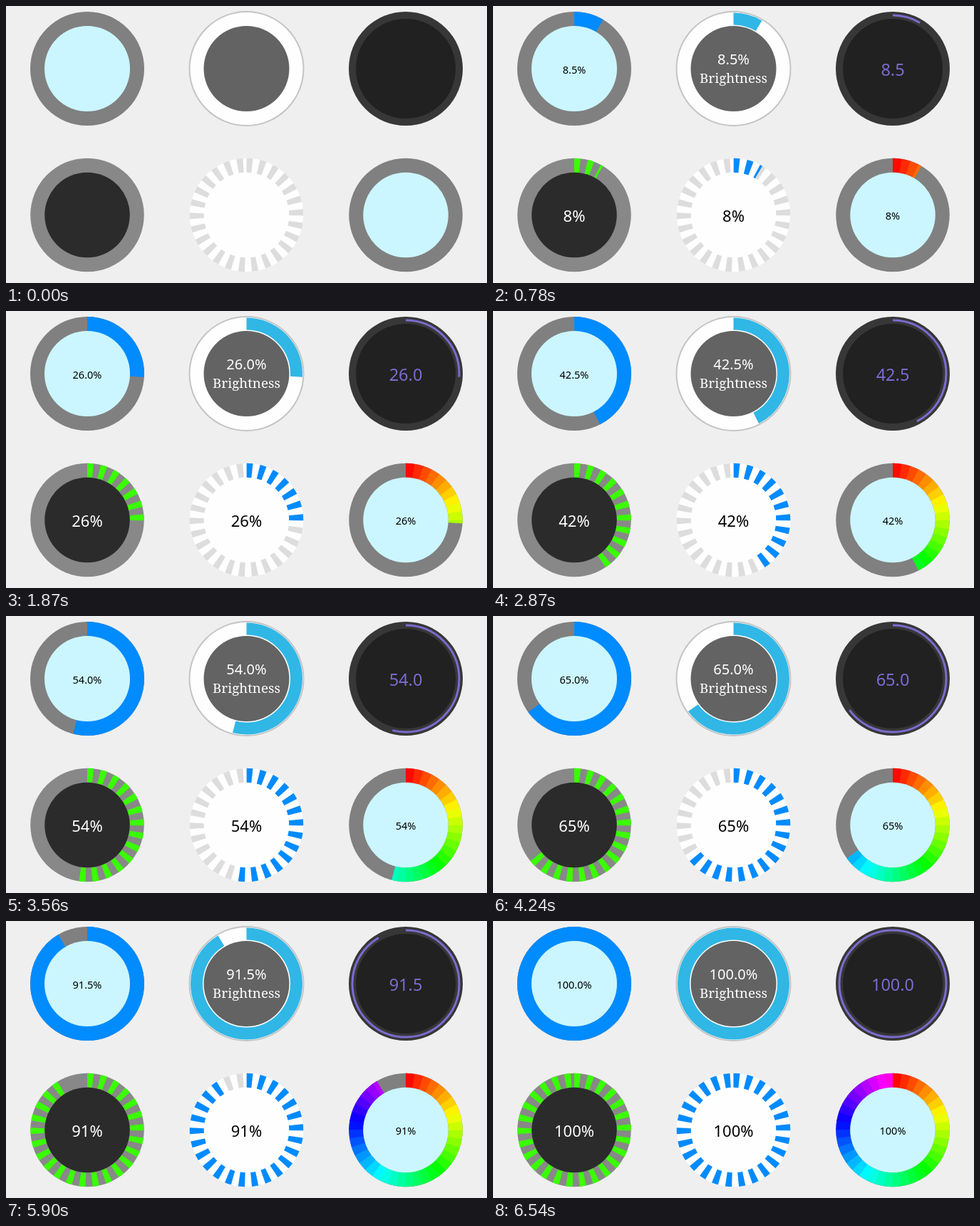
These frames come from a looping animation (675 px wide and 389 px high, 8000 ms). An HTML page without scripts:

```html
<!DOCTYPE html>
<html lang="en">
<head>
<meta charset="utf-8">
<title>Circular gauges</title>
<style>
/* --h: progress in half percents, --i: whole percents */
@property --h { syntax: "<integer>"; inherits: true; initial-value: 0; }
@property --i { syntax: "<integer>"; inherits: true; initial-value: 0; }

html, body { margin: 0; width: 100%; height: 100%; overflow: hidden; background: #efefef; }
body { position: relative; animation: fill 8s -1ms infinite steps(1); }
svg { position: absolute; left: 0; top: 0; width: 675px; height: 389px; }

@keyframes fill {
  0% { --h: 0; }
  2.875% { --h: 0; animation-timing-function: steps(4); }
  9.75% { --h: 17; }
  11.625% { --h: 22; animation-timing-function: steps(3); }
  15.625% { --h: 32; }
  17.5% { --h: 37; animation-timing-function: steps(4); }
  23.375% { --h: 52; }
  24.375% { --h: 55; animation-timing-function: steps(4); }
  30.375% { --h: 70; }
  31.875% { --h: 74; animation-timing-function: steps(3); }
  35.875% { --h: 85; }
  37.75% { --h: 90; animation-timing-function: steps(5); }
  44.5% { --h: 108; }
  46.375% { --h: 113; animation-timing-function: steps(5); }
  53% { --h: 130; }
  55.125% { --h: 135; animation-timing-function: steps(3); }
  58.875% { --h: 145; }
  61% { --h: 151; animation-timing-function: steps(3); }
  64.625% { --h: 160; }
  66.75% { --h: 165; animation-timing-function: steps(5); }
  73.75% { --h: 183; }
  75.875% { --h: 188; animation-timing-function: steps(3); }
  80.25% { --h: 199; }
  81.75%, 100% { --h: 200; }
}
@keyframes show {
  0% { visibility: hidden; }
  2.875%, 100% { visibility: visible; }
}

.arc, .dash, .hue circle { fill: none; }
.arc { stroke-dasharray: calc(var(--h) * .5px) 200px; }
.dash { r: 69.75px; stroke-width: 20px; stroke-dasharray: 8px 9px; }
.hue circle {
  r: 69.75px;
  stroke: hsl(calc(var(--k) * 7.8 + 2) 100% 50%);
  stroke-width: 20px;
  stroke-dasharray: 12px 999px;
  stroke-dashoffset: calc(var(--k) * -10.956px);
}

.label {
  --i: calc(var(--h) / 2 - .25);
  counter-reset: i var(--i) d calc(5 * (var(--h) - 2 * var(--i)));
  position: absolute;
  left: calc(var(--x) * 1px - 80px);
  top: calc(var(--y) * 1px);
  width: 160px;
  text-align: center;
  white-space: nowrap;
  font: 500 14.5px/0 "Noto Sans", "Open Sans", sans-serif;
  color: #000;
  animation: show 8s -1ms infinite steps(1);
}
.dec::before { content: counter(i) "." counter(d); }
.int::before { content: counter(i); }
.name { font: 400 18.8px/0 "Noto Serif", serif; }
</style>
</head>
<body>
<svg viewBox="0 0 675 389">
  <mask id="done" maskUnits="userSpaceOnUse" x="-90" y="-90" width="180" height="180">
    <circle class="arc" r="69.75" pathLength="100" stroke="#fff" stroke-width="24"/>
  </mask>

  <g transform="translate(114 88) rotate(-90)">
    <circle r="80" fill="#808080"/>
    <circle class="arc" r="69.5" pathLength="100" stroke="#008bff" stroke-width="21"/>
    <circle r="60" fill="#cbf6ff"/>
  </g>

  <g transform="translate(337.5 88) rotate(-90)">
    <circle r="80" fill="#fefefe" stroke="#c4c4c4" stroke-width="2"/>
    <circle class="arc" r="70" pathLength="100" stroke="#30b7e6" stroke-width="17"/>
    <circle r="60" fill="#636363"/>
  </g>

  <g transform="translate(561 88) rotate(-90)">
    <circle r="80" fill="#373737"/>
    <circle r="70" fill="#212121"/>
    <circle class="arc" r="75" pathLength="100" stroke="#7d6bd0" stroke-width="3"/>
  </g>

  <g transform="translate(114 293.5) rotate(-90)">
    <circle r="79.75" fill="#888"/>
    <g mask="url(#done)"><circle class="dash" stroke="#3aff00"/></g>
    <circle r="59.75" fill="#2b2b2b"/>
  </g>

  <g transform="translate(337.5 293.5) rotate(-90)">
    <circle r="79.75" fill="#fefefe"/>
    <circle class="dash" stroke="#ddd"/>
    <g mask="url(#done)"><circle class="dash" stroke="#008bff"/></g>
  </g>

  <g transform="translate(561 293.5) rotate(-90)">
    <circle r="79.75" fill="#808080"/>
    <g class="hue" mask="url(#done)">
      <circle style="--k:0"/><circle style="--k:1"/><circle style="--k:2"/><circle style="--k:3"/>
      <circle style="--k:4"/><circle style="--k:5"/><circle style="--k:6"/><circle style="--k:7"/>
      <circle style="--k:8"/><circle style="--k:9"/><circle style="--k:10"/><circle style="--k:11"/>
      <circle style="--k:12"/><circle style="--k:13"/><circle style="--k:14"/><circle style="--k:15"/>
      <circle style="--k:16"/><circle style="--k:17"/><circle style="--k:18"/><circle style="--k:19"/>
      <circle style="--k:20"/><circle style="--k:21"/><circle style="--k:22"/><circle style="--k:23"/>
      <circle style="--k:24"/><circle style="--k:25"/><circle style="--k:26"/><circle style="--k:27"/>
      <circle style="--k:28"/><circle style="--k:29"/><circle style="--k:30"/><circle style="--k:31"/>
      <circle style="--k:32"/><circle style="--k:33"/><circle style="--k:34"/><circle style="--k:35"/>
      <circle style="--k:36"/><circle style="--k:37"/><circle style="--k:38"/><circle style="--k:39"/>
    </g>
    <circle r="59.75" fill="#cbf6ff"/>
  </g>
</svg>

<div class="label dec" style="--x:114; --y:88.5">%</div>
<div class="label dec" style="--x:337.5; --y:74.5; font-size:20px; color:#fff">%</div>
<div class="label name" style="--x:337.5; --y:100.7; color:#fff">Brightness</div>
<div class="label dec" style="--x:561; --y:88.5; font-size:23.5px; color:#7d6bd0"></div>
<div class="label int" style="--x:114; --y:293.5; font-size:22px; color:#fff">%</div>
<div class="label int" style="--x:337.5; --y:293.5; font-size:22px">%</div>
<div class="label int" style="--x:561; --y:293.5">%</div>
</body>
</html>
```
